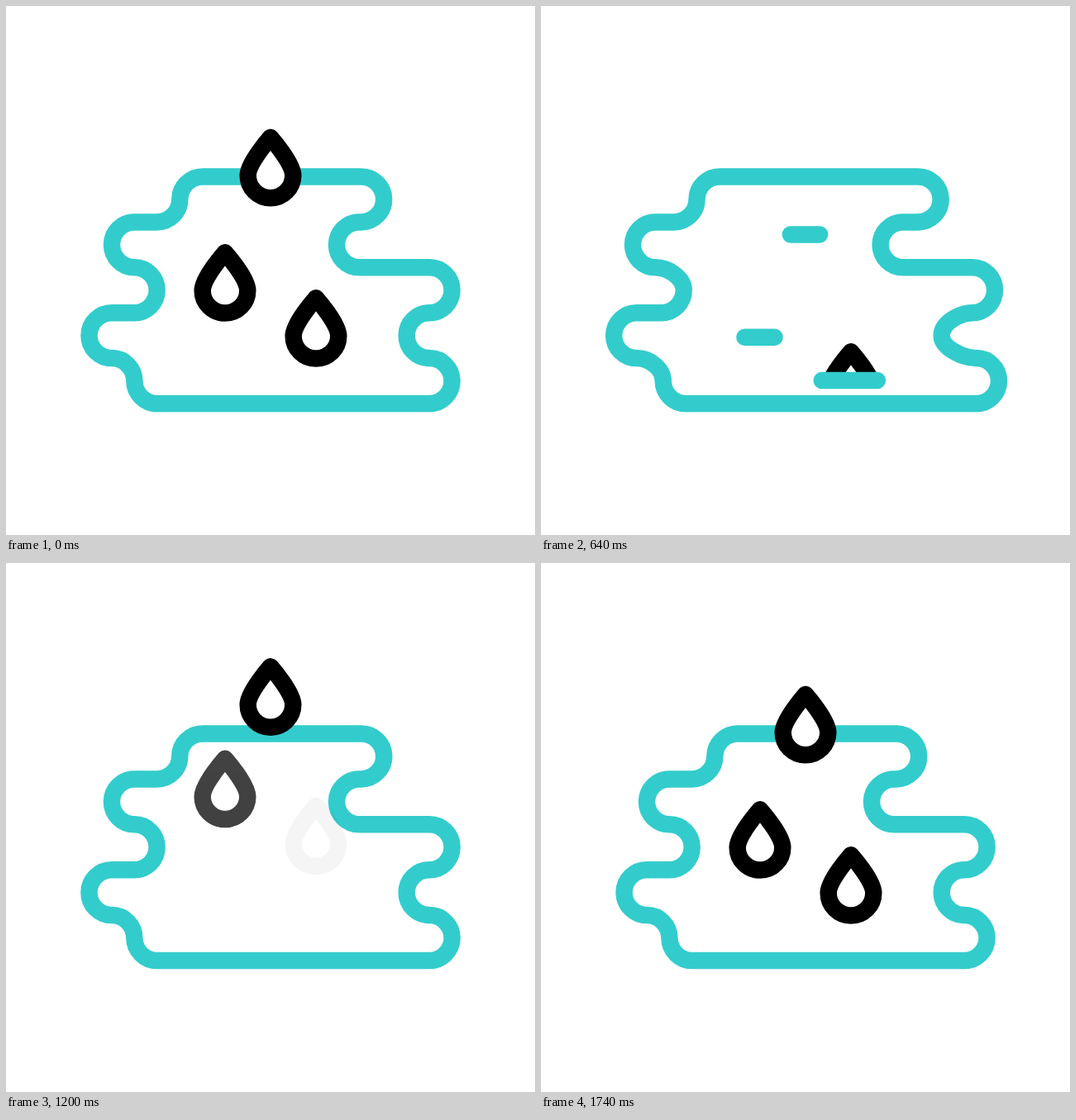
An HTML page for the animation above (1940 ms loop, 640 by 640 pixels).

```html
<!DOCTYPE html>
<html lang="en">
<head>
<meta charset="utf-8">
<title>Rain puddle</title>
<style>
  html, body { margin: 0; width: 100%; height: 100%; overflow: hidden; background: #fff; }
  svg { display: block; width: 100%; height: 100%; }
  .stroke { stroke-width: 20.5; stroke-linecap: round; stroke-linejoin: round; }
  .water { fill: none; stroke: #33cccc; }
  .drop { fill: #fff; stroke: #000; }
</style>
</head>
<body>
<svg id="stage" viewBox="0 0 640 640"></svg>
<script>
const LOOP = 1940, STEP = 20;
const stage = document.getElementById('stage');

function add(parent, tag, attrs) {
  const el = document.createElementNS('http://www.w3.org/2000/svg', tag);
  for (const key in attrs) el.setAttribute(key, attrs[key]);
  parent.appendChild(el);
  return el;
}

const clamp = v => Math.min(1, Math.max(0, v));
const progress = (t, from, to) => clamp((t - from) / (to - from));
const smooth = u => u * u * (3 - 2 * u);
const wave = u => (1 - Math.cos(Math.PI * u)) / 2;

// Linear interpolation through [time, value] pairs
function track(keys, t) {
  if (t <= keys[0][0]) return keys[0][1];
  for (let i = 1; i < keys.length; i++) {
    const [t0, v0] = keys[i - 1], [t1, v1] = keys[i];
    if (t < t1) return v0 + (v1 - v0) * (t - t0) / (t1 - t0);
  }
  return keys[keys.length - 1][1];
}

// Puddle nodes: heading, x, row, sideways shift when fully spread
const ROW = 27.45, TOP = 206.5, HANDLE = 15.1;
const HEADING = { R: [1, 0], L: [-1, 0], U: [0, -1], D: [0, 1] };
const shore = [
  ['R', 238, 0, -22.4], ['R', 429.7, 0, 27.2], ['D', 457.2, 1, 27.2], ['L', 429.7, 2, 27.2],
  ['L', 427.4, 2, 10.9], ['D', 400, 3, 10.9], ['R', 427.4, 4, 10.9],
  ['R', 512.2, 4, 9.7], ['D', 539.6, 5, 9.7], ['L', 512.2, 6, 9.7],
  ['D', 484.7, 7, 0],
  ['R', 512.2, 8, 14.8], ['D', 539.6, 9, 14.8], ['L', 512.2, 10, 14.8],
  ['L', 182.8, 10, -7.9], ['U', 155.4, 9, -7.9],
  ['L', 128, 8, -12.7], ['U', 100.5, 7, -12.7], ['R', 128, 6, -12.7],
  ['R', 155.3, 6, -10.2], ['U', 182.7, 5, -10.2],
  ['L', 155.4, 4, -17.5], ['U', 128, 3, -17.5], ['R', 155.4, 2, -17.5],
  ['R', 182.8, 2, -22.4], ['U', 210.3, 1, -22.4]
];

function shorePath(spread) {
  const nodes = shore.map(([dir, x, row, shift]) => ({
    x: x + shift * spread, y: TOP + row * ROW, dir: HEADING[dir]
  }));
  let d = `M${nodes[0].x} ${nodes[0].y}`;
  nodes.forEach((a, i) => {
    const b = nodes[(i + 1) % nodes.length];
    d += a.y === b.y ? `L${b.x} ${b.y}` :
      `C${a.x + a.dir[0] * HANDLE} ${a.y + a.dir[1] * HANDLE} ` +
      `${b.x - b.dir[0] * HANDLE} ${b.y - b.dir[1] * HANDLE} ${b.x} ${b.y}`;
  });
  return d + 'Z';
}

// fall: pixels fallen at 500 ms and growth per 100 ms
// enter: start, end, height above the resting place
// ripple: half length over time
const drops = [
  { x: 320, y: 205, fall: [96, 2.33], enter: [904, 1451, 76.7],
    line: [319.5, 276.5], ripple: [[225, 0], [300, 18.8], [500, 45.8], [540, 47], [700, 0]] },
  { x: 265, y: 344.2, fall: [49.5, 2.26], enter: [1049, 1566, 77.5],
    line: [264.5, 400.8], ripple: [[200, 0], [300, 29.3], [400, 46], [500, 43.3], [740, 0]] },
  { x: 375, y: 399.2, fall: [26, 1.89], enter: [1193, 1740, 59.6],
    line: [373.3, 453], ripple: [[270, 0], [300, 6.5], [500, 48], [580, 48], [780, 0]] }
];
const DROP = 'M0-46C0-46-27.3-15.1-27.3 0a27.3 27.3 0 0 0 54.6 0C27.3-15.1 0-46 0-46Z';

const puddle = add(stage, 'path', { class: 'stroke water' });

drops.forEach((drop, i) => {
  const clip = add(stage, 'clipPath', { id: 'above' + i });
  add(clip, 'rect', { width: 640, height: drop.line[1] });
  const layer = add(stage, 'g', { 'clip-path': `url(#above${i})` });
  drop.group = add(layer, 'g', {});
  add(drop.group, 'path', { class: 'stroke drop', d: DROP });
  drop.water = add(stage, 'path', { class: 'stroke water' });
});

function drawDrop(drop, t) {
  const [start, end, height] = drop.enter;
  let offset, opacity = 1;
  if (t < 860) {
    const [reach, grow] = drop.fall;
    offset = Math.min(150, reach * (grow ** (t / 100) - 1) / (grow ** 5 - 1));
  } else {
    offset = -height * (1 - smooth(progress(t, start, end)));
    opacity = progress(t, start, start + 204);
  }
  drop.group.setAttribute('transform', `translate(${drop.x} ${drop.y + offset})`);
  drop.group.setAttribute('opacity', opacity);

  const half = track(drop.ripple, t), [x, y] = drop.line;
  drop.water.setAttribute('d', half > 0 ? `M${x - half} ${y}H${x + half}` : '');
}

function draw(now) {
  const t = Math.floor((now % LOOP) / STEP) * STEP;
  const spread = t < 680 ? wave(progress(t, 305, 680)) : 1 - wave(progress(t, 680, 1220));
  puddle.setAttribute('d', shorePath(spread));
  drops.forEach(drop => drawDrop(drop, t));
}

const begin = performance.now();
function tick() {
  draw(performance.now() - begin);
  requestAnimationFrame(tick);
}
tick();
</script>
</body>
</html>
```
